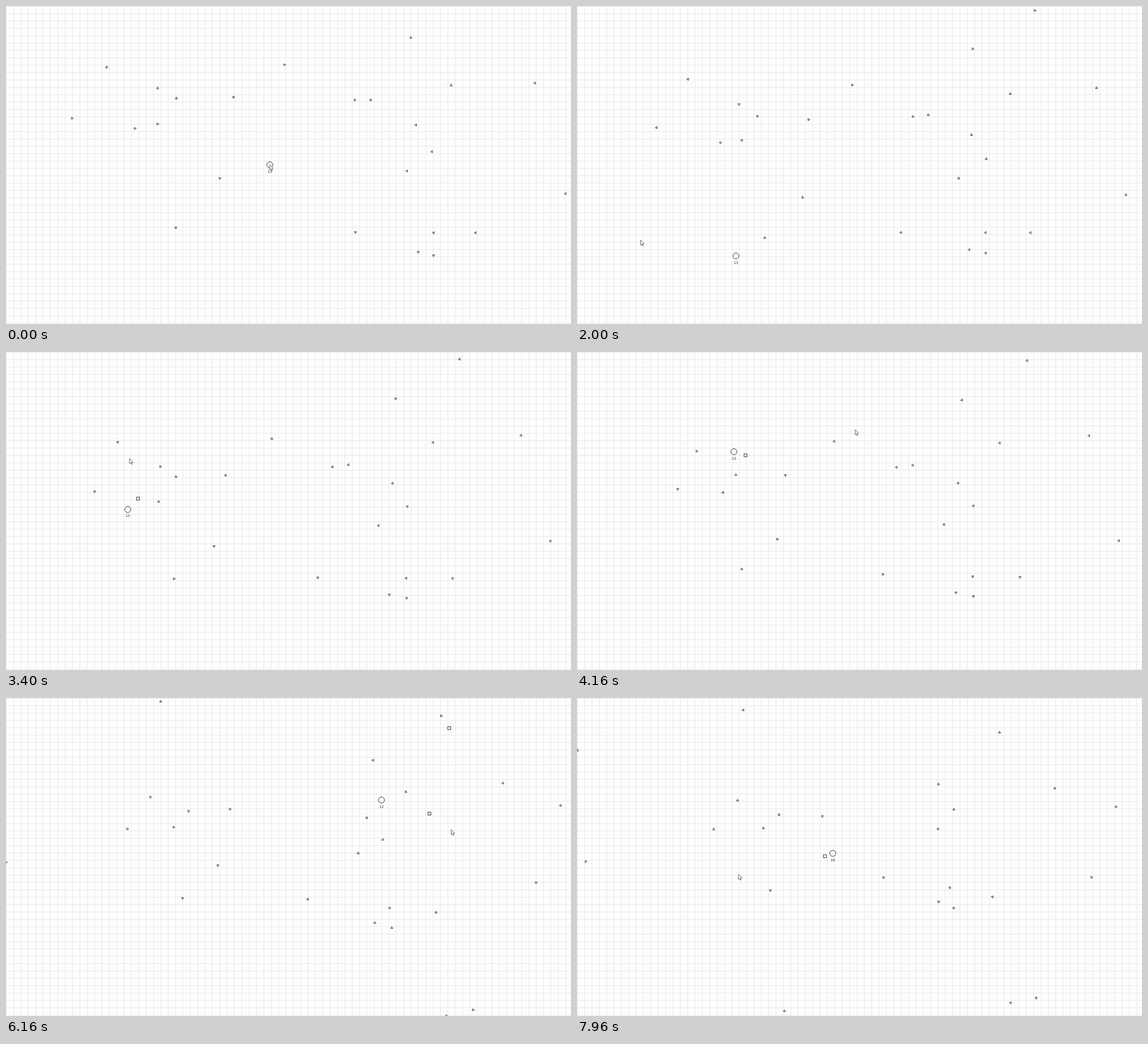
An HTML page with a canvas for the animation above (8000 ms loop, 998 by 561 pixels).

```html
<!DOCTYPE html>
<html lang="en">
<head>
<meta charset="utf-8">
<title>Chase</title>
<style>
  html, body { margin: 0; width: 100%; height: 100%; overflow: hidden; background: #fdfdfb; }
  canvas { display: block; }
</style>
</head>
<body>
<canvas id="stage" width="998" height="561"></canvas>
<script>
const ctx = document.getElementById('stage').getContext('2d');
const W = 998, H = 561, LOOP = 8000, STEP = 10, CELL = 12.995;
const INK = '#222', PAPER = '#fdfdfb';
const BULLET_SPEED = 0.251, ENEMY_SPEED = 0.0375, REACH = 400;

// Way points: [ms, x, y]
const playerPath = [
  [0, 466, 280], [400, 482, 328], [800, 485, 402], [1250, 430, 469], [2000, 281, 441],
  [2500, 200, 402], [2900, 189, 345], [3400, 215, 278], [4160, 277, 176], [4600, 356, 168],
  [5430, 519.5, 190], [6160, 663, 180], [6400, 693, 189], [6700, 674, 208], [7960, 452, 274]
];
const cursorPath = [
  [0, 466, 280], [830, 445, 428], [1250, 330, 465], [2000, 112.5, 413], [2250, 89, 385],
  [2530, 110, 335], [3400, 218, 188], [4160, 491, 137], [5430, 740, 182.5],
  [6160, 786.5, 232], [7200, 520, 308], [7960, 285.5, 311]
];

// Start x, y, and where needed the times of birth and death
const enemies = [
  [715, 56], [178, 108], [301, 163], [402, 161], [786, 140], [934, 136], [117, 198], [268, 208],
  [752, 257], [300, 391], [617, 399], [755, 400], [829, 400], [728, 434], [755, 440], [988, 331],
  [816, 0, 700], [998, 190, 4500], [833, 561, 4980], [263, 0, 5350],
  [0, 290, 6100], [778, 561, 6130], [362, 561, 7350], [0, 92, 7850],
  [228, 216, 0, 3130], [268, 145, 0, 3640], [492, 104, 0, 4870], [616, 166, 0, 5410],
  [644, 166, 0, 5570], [724, 210, 0, 6850], [708, 291, 0, 7050], [378, 304, 0, 7890]
].map(row => pursue(...row));

// Time fired, heading, time gone
const shots = [
  [2550, -1.19, 3130], [3150, -0.99, 3640], [4010, -0.26], [4350, -0.1, 4870],
  [4570, 0.091], [4800, 0.19, 5410], [6950, 2.87, 7890], [7730, 2.84]
];
const hits = [5570, 6850, 7050];

// Smooth curve through timed way points
function along(path, t) {
  let i = 0;
  while (i < path.length - 2 && t >= path[i + 1][0]) i++;
  const a = path[i], b = path[i + 1], span = b[0] - a[0], u = (t - a[0]) / span;
  const before = path[Math.max(i - 1, 0)], after = path[Math.min(i + 2, path.length - 1)];
  return [1, 2].map(k => {
    const ma = (b[k] - before[k]) / (b[0] - before[0]) * span;
    const mb = (after[k] - a[k]) / (after[0] - a[0]) * span;
    const d = b[k] - a[k];
    return a[k] + u * (ma + u * (3 * d - 2 * ma - mb + u * (ma + mb - 2 * d)));
  });
}

// Heads for the player, faster when near
function pursue(x, y, birth = 0, death = LOOP) {
  const track = [];
  for (let t = birth; t <= death; t += STEP) {
    track.push([x, y]);
    const [px, py] = along(playerPath, t);
    const r = Math.hypot(px - x, py - y);
    const part = Math.min(1, ENEMY_SPEED * STEP * Math.exp(-r / REACH) / (r || 1));
    x += (px - x) * part;
    y += (py - y) * part;
  }
  return { birth, death, track };
}

function polygon(points, fill, stroke, width) {
  ctx.beginPath();
  points.forEach(([x, y]) => ctx.lineTo(x, y));
  ctx.closePath();
  ctx.fillStyle = fill;
  ctx.fill();
  ctx.strokeStyle = stroke;
  ctx.lineWidth = width;
  ctx.lineJoin = 'round';
  ctx.stroke();
}

function drawGrid() {
  ctx.fillStyle = PAPER;
  ctx.fillRect(0, 0, W, H);
  ctx.fillStyle = '#e8e8e6';
  for (let x = 0; x < W; x += CELL) ctx.fillRect(Math.round(x), 0, 1, H);
  for (let y = 0; y < H; y += CELL) ctx.fillRect(0, Math.round(y), W, 1);
}

function drawEnemy({ birth, death, track }, t, [px, py]) {
  if (t < birth || t >= death) return;
  const [x, y] = track[Math.floor((t - birth) / STEP)];
  ctx.save();
  ctx.translate(x, y);
  ctx.rotate(Math.atan2(py - y, px - x));
  polygon([[2, 0], [-1.3, -2], [-1.3, 2]], PAPER, INK, 0.8);
  ctx.restore();
}

function drawShot([fired, heading, gone = LOOP], t) {
  if (t < fired || t >= gone) return;
  const [x, y] = along(playerPath, fired), way = BULLET_SPEED * (t - fired);
  ctx.strokeStyle = INK;
  ctx.lineWidth = 0.9;
  ctx.strokeRect(x + way * Math.cos(heading) - 2.6, y + way * Math.sin(heading) - 2.6, 5.2, 5.2);
}

function drawPlayer([x, y], health) {
  ctx.strokeStyle = INK;
  ctx.lineWidth = 0.9;
  ctx.beginPath();
  ctx.arc(x, y, 5.3, 0, Math.PI * 2);
  ctx.stroke();
  ctx.fillStyle = INK;
  ctx.font = '6px "DejaVu Sans", sans-serif';
  ctx.textAlign = 'center';
  ctx.fillText(health, x, y + 13.6);
}

function drawCursor([x, y]) {
  ctx.save();
  ctx.translate(x, y);
  polygon([[0, 0], [0, 9], [2, 7.2], [3.4, 10.4], [4.8, 9.8], [3.4, 6.7], [6.2, 6.5]],
    '#fff', '#444', 0.8);
  ctx.restore();
}

function draw(t) {
  const player = along(playerPath, t);
  drawGrid();
  enemies.forEach(enemy => drawEnemy(enemy, t, player));
  shots.forEach(shot => drawShot(shot, t));
  drawPlayer(player, 13 - hits.filter(h => t >= h).length);
  drawCursor(along(cursorPath, t));
}

const start = performance.now();
function tick() {
  draw((performance.now() - start) % LOOP);
  requestAnimationFrame(tick);
}
tick();
</script>
</body>
</html>
```
